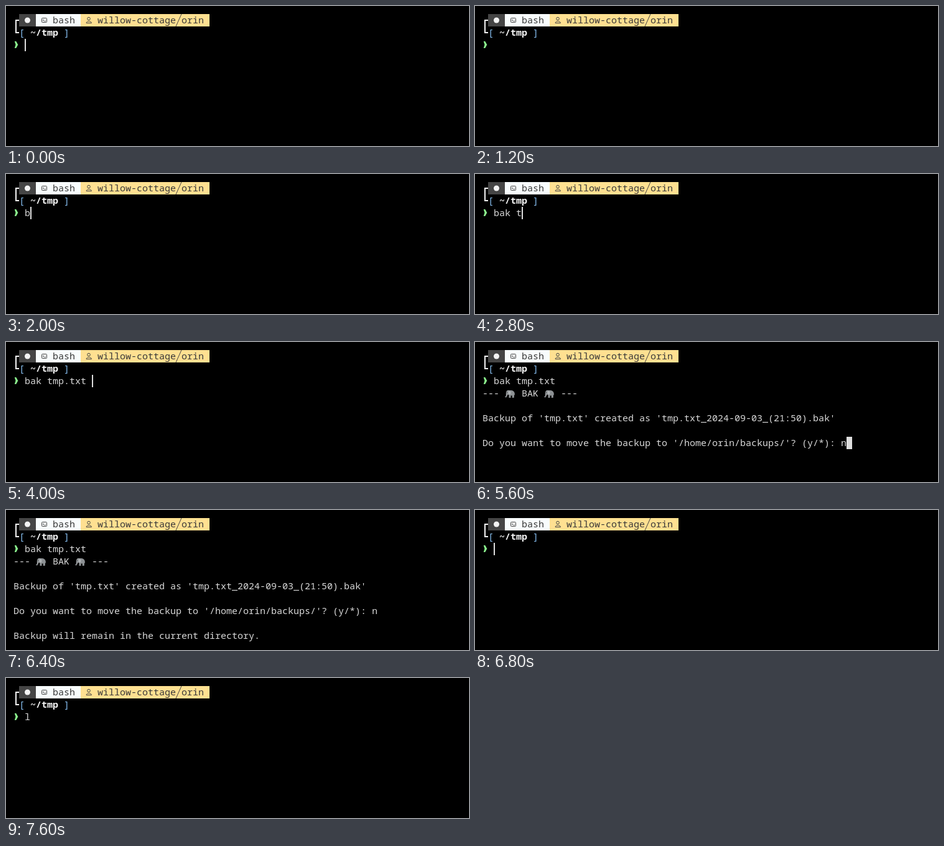
Animation of 744x226 px, one loop 8 s. Source, as an HTML page:

```html
<!DOCTYPE html>
<html lang="en">
<head>
<meta charset="utf-8">
<title>Terminal backup demo</title>
<style>
  html, body { margin: 0; width: 100%; height: 100%; overflow: hidden; background: #000; }
  svg { display: block; width: 744px; height: 226px; }
  text {
    font: 500 15px "Noto Sans Mono", "DejaVu Sans Mono", monospace;
    font-variant-ligatures: none;
    white-space: pre;
    fill: #d8d8d8;
  }
  .bar text { font-weight: 400; fill: #383838; }
  .icon { fill: none; stroke: #444; stroke-width: 1; }
  .path { fill: #f4f4f4; font-weight: 600; }
  .bracket { fill: #86bdf0; }
</style>
</head>
<body>
<svg viewBox="0 0 744 226" xmlns="http://www.w3.org/2000/svg">
  <defs>
    <g id="elephant">
      <path fill="#8d9194" d="M2 5C2.500 2 5 1 7.500 2C11 1.500 15 2.500 15.700 6.500L16 10L15 9L14.700 14H11.700V10.500H9.500V14H6.500V9.500C5.500 9.500 4.500 9.200 4 8.800C3.800 11 3.600 13 1.800 13.500C.5 13.700 0 12.500 .3 11.500L1.500 11.800C2.200 10 1.500 7.500 2 5Z"/>
      <path fill="#b0b4b6" d="M5.500 3.500C8 2.500 10 4 9.500 6.500C9.200 8.700 7.500 9.500 6.500 8.500C5.500 7.500 5 5.500 5.500 3.500Z"/>
      <circle cx="3.700" cy="5.500" r=".6" fill="#222"/>
      <path fill="none" stroke="#e8e8e8" d="M4 9L2.800 10.200"/>
    </g>
  </defs>
  <rect width="744" height="226"/>

  <g class="bar">
    <rect x="21" y="13" width="27" height="20" fill="#454545"/>
    <rect x="48" y="13" width="72" height="20" fill="#f8fcfd"/>
    <rect x="120" y="13" width="207" height="20" fill="#ffe091"/>
    <circle cx="34.500" cy="23" r="4.500" fill="#f4f4f4"/>
    <rect class="icon" x="57.500" y="19.500" width="8" height="7" rx="1"/>
    <path class="icon" d="M59 21.500L60.800 23L59 24.500M61.500 24.500H64"/>
    <circle class="icon" cx="133" cy="20.500" r="2.300"/>
    <path class="icon" d="M129 27.500C129 23.800 137.500 23.800 137.500 27.500Z"/>
    <path class="icon" d="M273 33L282 13"/>
    <text x="75" y="28">bash</text>
    <text x="147" y="28">willow-cottage</text>
    <text x="282" y="28">orin</text>
  </g>

  <path d="M21 23H16V43H21" fill="none" stroke="#f4f4f4" stroke-width="2"/>
  <text class="bracket" x="21" y="48">[</text>
  <text class="path" x="39" y="48">~/tmp</text>
  <text class="bracket" x="93" y="48">]</text>
  <path d="M13.800 57H16.300L19.300 62.500L16.300 68H13.800L15.500 62.500Z" fill="#8cf58e"/>
  <text id="command" x="30" y="68"></text>

  <g id="output">
    <text x="12" y="88">---</text>
    <use href="#elephant" x="48" y="76"/>
    <text x="75" y="88">BAK</text>
    <use href="#elephant" x="111" y="76"/>
    <text x="138" y="88">---</text>
    <text x="12" y="128">Backup of 'tmp.txt' created as 'tmp.txt_2024-09-03_(21:50).bak'</text>
    <text id="question" x="12" y="168"></text>
    <text id="result" x="12" y="208">Backup will remain in the current directory.</text>
  </g>
  <rect id="cursor" height="20" fill="#dedede"/>
</svg>
<script>
  const LOOP = 8000, BLINK = 400, CELL = 9;
  const QUESTION = "Do you want to move the backup to '/home/orin/backups/'? (y/*): ";
  const el = id => document.getElementById(id);
  const [command, output, question, result, cursor] =
    ["command", "output", "question", "result", "cursor"].map(el);

  // Each step restarts the cursor blink.
  const steps = [
    { at: 0, cmd: "" },
    { at: 2000, cmd: "b" },
    { at: 2400, cmd: "bak" },
    { at: 2800, cmd: "bak t" },
    { at: 3200, cmd: "bak tmp.txt " },
    { at: 4400, cmd: "bak tmp.txt", answer: "" },
    { at: 5600, cmd: "bak tmp.txt", answer: "n" },
    { at: 6000, cmd: "bak tmp.txt", answer: "n", done: true },
    { at: 6800, cmd: "" },
    { at: 7200, cmd: "l" }
  ];

  const show = (node, on) => node.setAttribute("visibility", on ? "inherit" : "hidden");

  function placeCursor(x, y, width) {
    cursor.setAttribute("x", x);
    cursor.setAttribute("y", y);
    cursor.setAttribute("width", width);
  }

  function draw(time) {
    const t = time % LOOP;
    const step = steps.filter(s => s.at <= t).pop();
    const running = step.answer !== undefined;
    const line = QUESTION + (step.answer || "");

    command.textContent = step.cmd;
    question.textContent = line;
    show(output, running);
    show(result, running && step.done);

    if (step.done) placeCursor(12, 213, CELL);
    else if (running) placeCursor(12 + line.length * CELL, 153, CELL);
    else placeCursor(30 + step.cmd.length * CELL, 53, 2);
    show(cursor, Math.floor((t - step.at) / BLINK) % 2 === 0);
  }

  const start = performance.now();
  function tick() {
    draw(performance.now() - start);
    requestAnimationFrame(tick);
  }
  tick();
</script>
</body>
</html>
```
